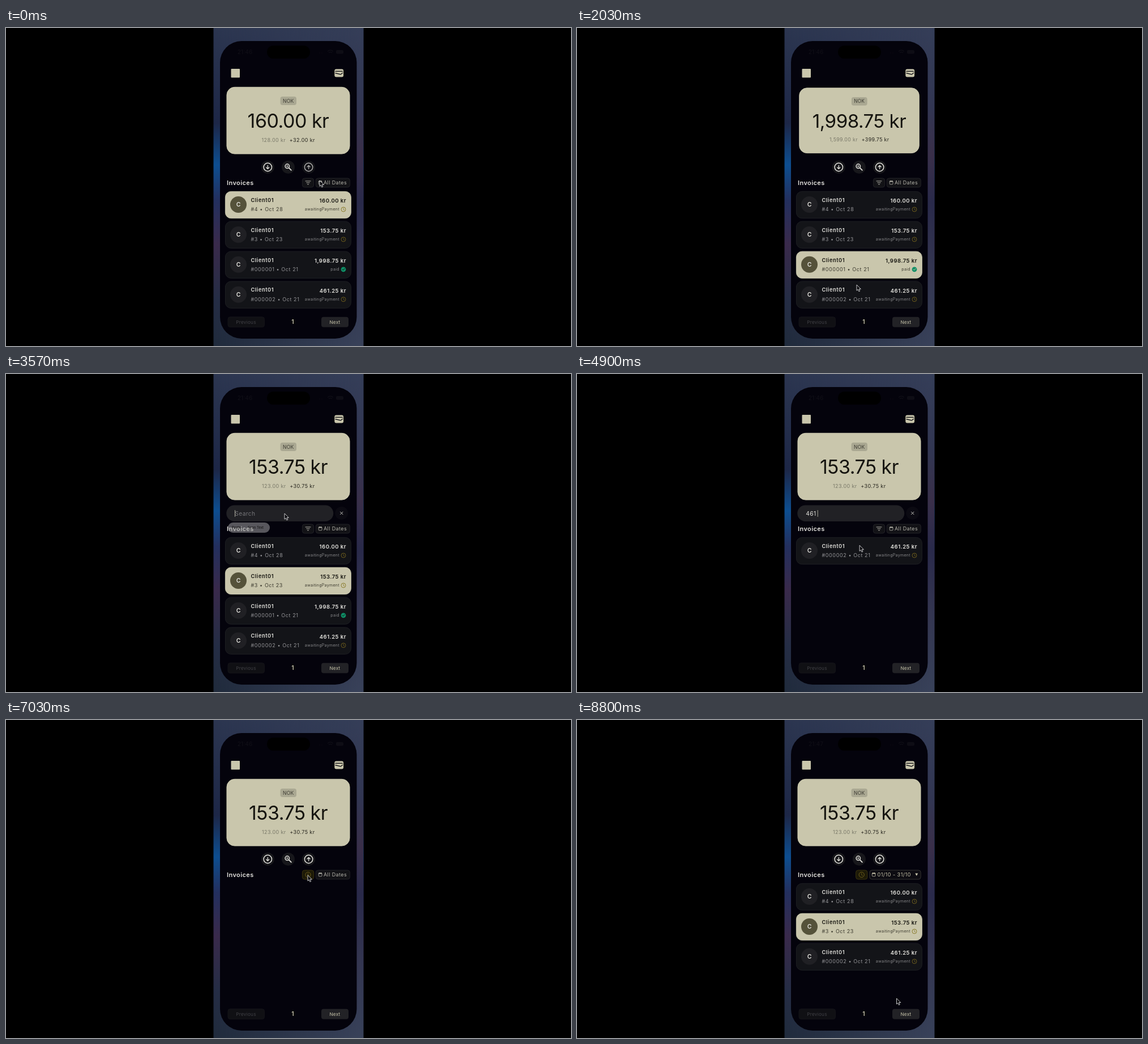
Animation, 998 px wide and 561 px high, one loop 8830 ms. Source, as an HTML page:

```html
<!DOCTYPE html>
<html lang="en">
<head>
<meta charset="utf-8">
<title>Invoices</title>
<style>
  html, body { margin: 0; width: 100%; height: 100%; overflow: hidden; background: #000; }
  svg { display: block; width: 998px; height: 561px; font-family: Inter, Roboto, sans-serif; }
  text { white-space: pre; }
  .t { font-size: 9px; letter-spacing: .4px; }
  .b { font-weight: 600; }
  .m { text-anchor: middle; }
  .e { text-anchor: end; }
  .line { fill: none; stroke-linecap: round; stroke-linejoin: round; }
</style>
</head>
<body>
<svg id="stage" viewBox="0 0 998 561"></svg>
<script>
const LOOP = 8830;
const CREAM = '#c9c6ac', DARK = '#04030c', INK = '#15140f', PALE = '#e4e3de', GREY = '#b4b3aa';
const INVOICES = [
  { id: '#4', date: 'Oct 28', sum: '160.00', net: '128.00', vat: '32.00' },
  { id: '#3', date: 'Oct 23', sum: '153.75', net: '123.00', vat: '30.75' },
  { id: '#000001', date: 'Oct 21', sum: '1,998.75', net: '1,599.00', vat: '399.75', paid: true },
  { id: '#000002', date: 'Oct 21', sum: '461.25', net: '369.00', vat: '92.25' }
];

// Drawing helpers
const text = (x, y, s, fill, cls = 't', style = '') =>
  `<text x="${x}" y="${y}" fill="${fill}" class="${cls}" style="${style}">${s}</text>`;
const box = (x, y, w, h, r, fill, stroke = 'none') =>
  `<rect x="${x}" y="${y}" width="${w}" height="${h}" rx="${r}" fill="${fill}" stroke="${stroke}" stroke-width=".8"/>`;
const disc = (x, y, r, fill, stroke = 'none', w = 1) =>
  `<circle cx="${x}" cy="${y}" r="${r}" fill="${fill}" stroke="${stroke}" stroke-width="${w}"/>`;
const line = (d, color, w = 1) => `<path class="line" d="${d}" stroke="${color}" stroke-width="${w}"/>`;
const group = (id, body, attrs = '') => `<g id="${id}" ${attrs}>${body}</g>`;
const cross = (x, y, r, color) => line(`M${x - r} ${y - r}l${2 * r} ${2 * r}m0 ${-2 * r}l${-2 * r} ${2 * r}`, color);
const clock = (x, y, r, color) =>
  disc(x, y, r, 'none', color, .9) + line(`M${x} ${y - r * .55}v${r * .6}l${r * .4} ${r * .25}`, color, .8);
const calendar = (x, y, s, color) =>
  box(x, y, s, s, 1, 'none', color) + box(x, y, s, s * .28, .5, color) +
  line(`M${x + s * .25} ${y - .7}v1M${x + s * .75} ${y - .7}v1`, color, .9);

function rowLook(inv, on) {
  const main = on ? INK : PALE, soft = on ? '#3d3b30' : '#949497';
  const badge = inv.paid
    ? disc(596, 32, 4.4, '#0f8f66') + line('M594 32l1.5 1.5 2.7-3', on ? CREAM : '#101114', 1)
    : clock(596, 32, 4, on ? '#857520' : '#75641d');
  return box(.4 + 387, .4, 222, 47.2, 10, on ? CREAM : '#131418', on ? '#d6d3b8' : '#232428') +
    disc(410.5, 23.5, 14.5, on ? '#55523a' : '#202024') +
    text(410.6, 27.4, 'C', PALE, 'b m', 'font-size:10.5px') +
    text(432.5, 18.8, 'Client01', main, 'b', 'font-size:9.2px;letter-spacing:.6px') +
    text(432.5, 35.2, `${inv.id} • ${inv.date}`, soft, 't', 'letter-spacing:.6px') +
    text(601, 20.2, `${inv.sum} kr`, main, 'b e', 'font-size:9.5px;letter-spacing:.5px') +
    text(588.8, 34.4, inv.paid ? 'paid' : 'awaitingPayment', on ? '#3d3b30' : '#88888a', 'e',
      'font-size:7px;letter-spacing:.3px');
  }
const badgeOf = inv => inv;

function rowMarkup(inv, i) {
  const badge = on => inv.paid
    ? disc(596, 32, 4.4, '#0f8f66') + line('M594 32l1.5 1.5 2.7-3', on ? CREAM : '#101114')
    : clock(596, 32, 4, on ? '#857520' : '#75641d');
  return group('row' + i, rowLook(inv, false) + badge(false) +
    group('on' + i, rowLook(inv, true) + badge(true)));
}

const circleArrow = (x, dir) => disc(x, 245.5, 11.5, '#17171b') + disc(x, 245.5, 7.2, 'none', PALE, 1.5) +
  line(`M${x} ${245.5 - 3 * dir}v${6 * dir}m-2.5 ${-2.5 * dir}l2.5 ${2.5 * dir}l2.5 ${-2.5 * dir}`, PALE, 1.3);

const backdrop = `
  <defs>
    <linearGradient id="left" x2="0" y2="1">
      <stop stop-color="#2c3650"/><stop offset=".3" stop-color="#1d2747"/>
      <stop offset=".43" stop-color="#0d4f92"/><stop offset=".54" stop-color="#23305f"/>
      <stop offset=".68" stop-color="#3a2a4b"/><stop offset=".85" stop-color="#252d45"/>
      <stop offset="1" stop-color="#202b3c"/>
    </linearGradient>
    <linearGradient id="right" x2="0" y2="1">
      <stop stop-color="#353e58"/><stop offset=".25" stop-color="#333753"/>
      <stop offset=".4" stop-color="#3b2f48"/><stop offset=".55" stop-color="#2a2a4a"/>
      <stop offset=".75" stop-color="#343651"/><stop offset="1" stop-color="#39425a"/>
    </linearGradient>
    <linearGradient id="fade"><stop stop-color="#000"/><stop offset="1" stop-color="#fff"/></linearGradient>
    <mask id="blend"><rect x="366.5" width="265" height="561" fill="url(#fade)"/></mask>
  </defs>
  <rect width="998" height="561"/>
  <rect x="366.5" width="265" height="561" fill="url(#left)"/>
  <rect x="366.5" width="265" height="561" fill="url(#right)" mask="url(#blend)"/>`;

const header = box(378, 23, 241.5, 525, 38, DARK) + box(461, 31, 76, 23, 11.5, '#000') +
  group('status', text(422, 46, '21:46', '#0e0d15', 'b m', 'font-size:10px') +
    disc(554, 44, .8, '#0e0d15') + disc(558, 44, .8, '#0e0d15') +
    line('M568.5 41q4.5-4 9 0M570.5 43.5q2.5-2 5 0', '#0e0d15', 1.6) + box(583, 39, 13, 6.5, 2, '#0e0d15')) +
  box(397.5, 72, 15.5, 15.5, 1, CREAM) +
  box(580.3, 72.6, 15.8, 13.8, 3, CREAM) +
  line('M582 76.4h12.3M582 79.6l8 2.1q1.6.4 2.6-.8l1.7-1.6', DARK, 1.3);

const card = group('card', box(389.9, 104.3, 217.2, 117.8, 14, CREAM, '#d6d3b8') +
  box(484.5, 121, 28.5, 15, 4, '#aaa892') +
  text(498.7, 131.6, 'NOK', '#3c3b32', 'm', 'font-size:8.6px;letter-spacing:.2px') +
  text(498.5, 176.3, '', INK, 'm', 'font-size:34px;letter-spacing:-.5px').replace('<text', '<text id="sum"') +
  '<text x="498.7" y="201.4" class="t m"><tspan id="net" fill="#7a7969"></tspan><tspan id="vat" dx="7" fill="#24231c"></tspan></text>');

const actions = group('actions', circleArrow(462.3, 1) + disc(498.5, 245.5, 11.5, '#17171b') +
  disc(496.8, 243.8, 3.7, 'none', PALE, 1.5) + line('M499.8 246.8l4 4', PALE, 1.8) +
  line('M495.2 243.8h3.2m-1.6-1.6v3.2', PALE, .9) + group('up', circleArrow(534.6, -1)));

const search = group('search', box(389, 231.5, 189, 28.5, 14.2, '#212125').replace('<rect', '<rect id="pill"') +
  group('field', '<text id="query" x="404.3" y="249.5" style="font-size:10.2px;letter-spacing:.4px"></text>' +
    line('M404.5 240.5v11', '#a9a89a').replace('<path', '<path id="caret"')) +
  group('clear', disc(0, 245.5, 11.5, '#0b0a12') + cross(0, 245.5, 2.3, '#c8c7c0')));

const toolbar = text(390, 276.6, 'Invoices', PALE, 'b', 'font-size:11px;letter-spacing:.4px') +
  group('menu', box(392, 262, 74, 18, 9, '#9a9a9c') +
    text(399, 273, 'Paste', INK, '', 'font-size:6px') + text(427, 273, 'Scan Text', INK, '', 'font-size:6px')) +
  group('filter', group('plain', box(523.4, 265, 20.3, 16, 4, '#121216', '#28282c') +
      line('M529 270h9M530.8 272.9h5.4M532.4 275.8h2.2', GREY)) +
    group('gold', box(523.4, 265, 20.3, 16, 4, '#1d1a08', '#453c10') + clock(533.5, 273, 4.6, '#75641d'))) +
  group('allDates', box(547.2, 265, 60.2, 16, 4, '#121216', '#28282c') + calendar(552.2, 270, 5.8, GREY) +
    text(561, 276.2, 'All Dates', GREY)) +
  group('range', box(517, 265, 90.2, 16, 4, '#0d0c12', '#403f3a') + calendar(521.3, 270, 5.8, CREAM) +
    text(530.5, 276.2, '01/10 - 31/10', CREAM, 't', 'letter-spacing:.5px') +
    `<path d="M597.3 270.6h5l-2.5 4.4z" fill="${CREAM}"/>`);

const label = 'font-size:8.2px;letter-spacing:.25px';
const paging = box(392, 509.7, 64.5, 18, 4, '#101014', '#17171b') + text(424, 521.7, 'Previous', '#414146', 'm', label) +
  text(506.6, 522.4, '1', CREAM, 'b m', 'font-size:10.5px') +
  box(557, 509.7, 48, 18, 4, '#222226') + text(581, 521.7, 'Next', CREAM, 'm', label);

const chip = (x, y, w, s) => box(x, y, w, 21.6, 4, '#1d1d21', '#2e2e32') + text(x + 8, y + 14.1, s, '#c6c5bd');
const picker = (y, s) => text(416, y, s, '#a9a8a0', 't', 'letter-spacing:.5px') +
  box(416.3, y + 7.5, 164.5, 29, 8, '#1d1d22', '#2d2d32') + calendar(425, y + 18.3, 7.6, PALE) +
  text(440.8, y + 25.2, 'Select Date', '#d2d1ca');
const dialog = group('dialog',
  box(378, 23, 241.5, 525, 38, 'rgba(0,0,0,.65)') + box(402, 158.5, 193.5, 271.5, 14, '#151519') +
  text(416, 191.3, 'Filter by Date', PALE, 'b', 'font-size:11px;letter-spacing:.4px') +
  cross(566.5, 187.5, 3.3, GREY) +
  chip(416.3, 211.8, 70.3, 'Last 7 Days') + chip(490, 211.8, 77.4, 'Last 30 Days') + chip(416.3, 237.5, 68, 'This Month') +
  picker(282, 'Start Date') + picker(336, 'End Date') +
  box(416.3, 384.8, 78.4, 30.4, 4, 'none', '#4f4d38') +
  text(455.5, 403.7, 'Clear Filters', CREAM, 'm', 'font-size:10.5px;letter-spacing:.5px') +
  box(502, 384.5, 79, 31, 4, CREAM) +
  text(541.5, 403.7, 'Close', INK, 'b m', 'font-size:10.6px;letter-spacing:.4px'));

const cursor = group('cursor', '<path d="M0 0v10.2l2.3-2 1.6 3.6 1.8-.8-1.6-3.5h3.2z" fill="#08080c" stroke="#dddddf" stroke-width=".9" stroke-linejoin="round"/>');

const stage = document.getElementById('stage');
stage.innerHTML = backdrop + header + card + actions + search + toolbar +
  INVOICES.map(rowMarkup).join('') + paging + dialog + cursor;
const ui = {};
stage.querySelectorAll('[id]').forEach(el => ui[el.id] = el);
const statusTime = ui.status.querySelector('text');

// Timeline: times in ms
const PICKS = [[-500, 0], [950, 2], [1430, 0], [1860, 2], [2150, 3], [2560, 1]];
const LISTS = [[0, [0, 1, 2, 3]], [4250, []], [4400, [3]], [5650, []], [6330, [0, 1, 2, 3]], [6920, []], [7040, [0, 1, 3]]];
const QUERY = [[0, ''], [3740, '4'], [3850, '46'], [3980, '461'], [5150, '46'], [5230, '4'], [5310, '']];
const PILL = [[3200, 0], [3400, 189], [6080, 189], [6236, 0]];
const MENU = [[3500, 0], [3600, .8], [3640, .8], [3740, 0]];
const DIALOG = [[7715, 0], [7815, 1], [8400, 1], [8500, 0]];
const PATH = [
  [0, 554, 269], [350, 530, 330], [800, 500, 412], [1000, 495, 415], [1370, 484.5, 320], [1480, 485, 316],
  [1800, 490, 410], [1900, 491, 412], [2030, 494, 453], [2200, 495, 460], [2540, 500, 362], [2730, 500, 362],
  [3150, 498, 245], [3570, 492, 246], [4230, 492, 246], [4700, 500, 300], [5130, 498, 305], [5370, 498, 360],
  [5600, 498, 360], [6020, 593, 246], [6080, 593, 246], [6200, 587.5, 253], [6500, 545, 272], [6850, 533, 273],
  [7150, 533, 274], [7550, 583, 272], [7800, 585.5, 275], [8080, 452, 248], [8160, 452, 248],
  [8360, 541, 400], [8430, 541, 400], [8800, 564.5, 491]
];

const clamp = v => Math.max(0, Math.min(1, v));
const smooth = u => u * u * (3 - 2 * u);
const last = (track, t) => track.filter(k => k[0] <= t).pop();
function tween(track, t, i = 1, ease = u => u) {
  const n = track.findIndex(k => k[0] > t);
  if (n < 0) return track[track.length - 1][i];
  if (n === 0) return track[0][i];
  const a = track[n - 1], b = track[n];
  return a[i] + (b[i] - a[i]) * ease((t - a[0]) / (b[0] - a[0]));
}
const show = (el, on) => el.style.display = on ? '' : 'none';
const move = (el, x, y) => el.setAttribute('transform', `translate(${x} ${y})`);
const put = (el, s) => { if (el.textContent !== s) el.textContent = s; };

function drawCard(t) {
  const pick = last(PICKS, t), u = clamp((t - pick[0]) / 200);
  const before = last(PICKS, pick[0] - 1) || pick;
  const inv = INVOICES[(u < .5 ? before : pick)[1]];
  put(ui.sum, inv.sum + ' kr');
  put(ui.net, inv.net + ' kr');
  put(ui.vat, `+${inv.vat} kr`);
  const s = 1 - .055 * Math.sin(Math.PI * u);
  ui.card.setAttribute('transform', `translate(498.5 163.2) scale(${s}) translate(-498.5 -163.2)`);

  const lit = clamp((t - pick[0]) / 80);
  INVOICES.forEach((_, i) => {
    ui['on' + i].style.opacity = i === pick[1] ? lit : i === before[1] ? 1 - lit : 0;
  });
}

function drawList(t) {
  const list = last(LISTS, t)[1];
  INVOICES.forEach((_, i) => {
    const at = list.indexOf(i);
    show(ui['row' + i], at >= 0);
    move(ui['row' + i], 0, 288 + 52.9 * at);
  });
}

function drawSearch(t) {
  const w = tween(PILL, t), left = 498.25 - (w + 29) / 2;
  show(ui.search, w > 0);
  show(ui.actions, w === 0);
  ui.pill.setAttribute('x', left);
  ui.pill.setAttribute('width', w);
  move(ui.clear, left + w + 14.5, 0);
  show(ui.field, w > 150);
  const typed = last(QUERY, t)[1];
  put(ui.query, typed || 'Search');
  ui.query.setAttribute('fill', typed ? PALE : '#77777a');
  move(ui.caret, typed.length * 6.9, 0);
  ui.menu.style.opacity = tween(MENU, t);
}

function draw(t) {
  drawCard(t);
  drawList(t);
  drawSearch(t);
  const filtered = t >= 6920, ranged = t >= 8150;
  show(ui.plain, !filtered);
  show(ui.gold, filtered);
  show(ui.allDates, !ranged);
  show(ui.range, ranged);
  move(ui.filter, ranged ? -30.8 : 0, 0);
  put(statusTime, t < 7400 ? '21:46' : '21:47');
  ui.up.style.opacity = .75 + .25 * clamp(t / 200);
  ui.dialog.style.opacity = tween(DIALOG, t);
  move(ui.cursor, tween(PATH, t, 1, smooth), tween(PATH, t, 2, smooth));
}

let start;
function tick(now) {
  start ??= now;
  draw((now - start) % LOOP);
  requestAnimationFrame(tick);
}
draw(0);
requestAnimationFrame(tick);
</script>
</body>
</html>
```
